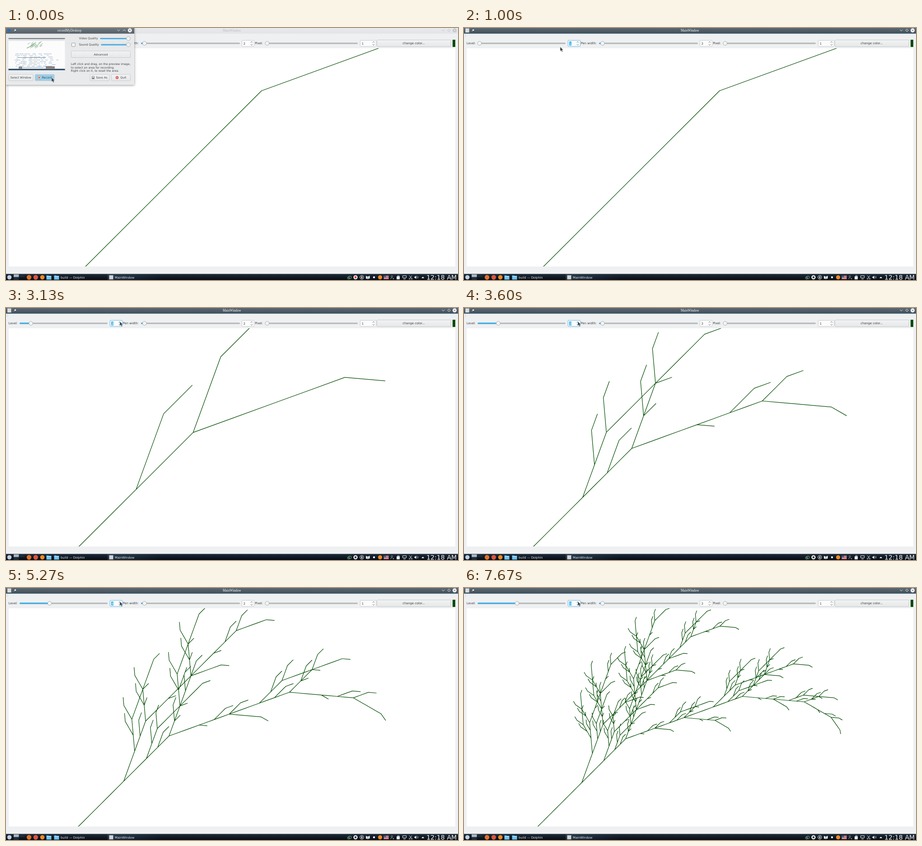
An HTML page with a canvas that plays this animation: 1001x559 px, repeating every 8000 ms.

```html
<!DOCTYPE html>
<html lang="en">
<head>
<meta charset="utf-8">
<title>Branching plant</title>
<style>
html, body { margin: 0; width: 100%; height: 100%; overflow: hidden; background: #eff0f1; }
canvas { display: block; }
</style>
</head>
<body>
<canvas id="stage" width="1001" height="559"></canvas>
<script>
const ctx = document.getElementById('stage').getContext('2d');
const LOOP = 8000;
const SANS = '"DejaVu Sans", sans-serif';
const SERIF = '"Liberation Serif", serif';
const BLUE = '#3daee9', INK = '#31363b', PANEL = '#eff0f1', GREEN = '#004b00';
const VIEW = { x: 6, y: 45, w: 989, h: 484 };

// ---- drawing helpers ----
function rect(x, y, w, h, fill) {
  ctx.fillStyle = fill;
  ctx.fillRect(x, y, w, h);
}
function box(x, y, w, h, fill, stroke, r = 1.5) {
  ctx.beginPath();
  ctx.roundRect(x, y, w, h, r);
  ctx.fillStyle = fill;
  ctx.fill();
  if (!stroke) return;
  ctx.strokeStyle = stroke;
  ctx.lineWidth = 0.8;
  ctx.stroke();
}
function disc(x, y, r, fill, stroke, width = 0.7) {
  ctx.beginPath();
  ctx.arc(x, y, r, 0, Math.PI * 2);
  if (fill) { ctx.fillStyle = fill; ctx.fill(); }
  if (stroke) { ctx.strokeStyle = stroke; ctx.lineWidth = width; ctx.stroke(); }
}
function lines(points, color, width = 0.9, close = false) {
  ctx.beginPath();
  for (let i = 0; i < points.length; i += 2) ctx.lineTo(points[i], points[i + 1]);
  if (close) ctx.closePath();
  ctx.strokeStyle = color;
  ctx.lineWidth = width;
  ctx.stroke();
}
function shape(points, fill) {
  ctx.beginPath();
  for (let i = 0; i < points.length; i += 2) ctx.lineTo(points[i], points[i + 1]);
  ctx.fillStyle = fill;
  ctx.fill();
}
function text(str, x, y, size = 6.7, color = INK, align = 'left', family = SANS) {
  ctx.font = `${size}px ${family}`;
  ctx.textAlign = align;
  ctx.textBaseline = 'alphabetic';
  ctx.fillStyle = color;
  ctx.fillText(str, x, y);
}
function shade(y0, y1, from, to) {
  const g = ctx.createLinearGradient(0, y0, 0, y1);
  g.addColorStop(0, from);
  g.addColorStop(1, to);
  return g;
}
const chevron = (x, y, s, dir, color, width = 0.9) =>
  lines([x - s, y + dir * s / 2, x, y - dir * s / 2, x + s, y + dir * s / 2], color, width);
function cross(x, y, s, color) {
  lines([x - s, y - s, x + s, y + s], color);
  lines([x - s, y + s, x + s, y - s], color);
}

// ---- the plant: X -> F-[[X]+X]+F[+FX]-X, F -> FF ----
const RULES = { X: 'F-[[X]+X]+F[+FX]-X', F: 'FF' };

function plant(level) {
  let word = 'X';
  for (let i = 0; i < level; i++) word = word.replace(/[XF]/g, c => RULES[c]);
  const turn = 25 * Math.PI / 180, segs = [], stack = [];
  let x = 0, y = 0, a = Math.PI / 4;
  let x0 = 0, x1 = 0, y0 = 0, y1 = 0;
  for (const c of word) {
    if (c === 'F') {
      const nx = x + Math.cos(a), ny = y - Math.sin(a);
      segs.push([x, y, nx, ny]);
      x = nx; y = ny;
      x0 = Math.min(x0, x); x1 = Math.max(x1, x);
      y0 = Math.min(y0, y); y1 = Math.max(y1, y);
    } else if (c === '+') a -= turn;
    else if (c === '-') a += turn;
    else if (c === '[') stack.push([x, y, a]);
    else if (c === ']') [x, y, a] = stack.pop();
  }
  const k = Math.min(VIEW.w / (x1 - x0), VIEW.h / (y1 - y0));
  const ox = VIEW.x + VIEW.w / 2 - k * (x0 + x1) / 2;
  const oy = VIEW.y + VIEW.h / 2 - k * (y0 + y1) / 2;
  const path = new Path2D();
  for (const [ax, ay, bx, by] of segs) {
    path.moveTo(ox + k * ax, oy + k * ay);
    path.lineTo(ox + k * bx, oy + k * by);
  }
  return path;
}
const plants = [1, 2, 3, 4, 5].map(plant);

// ---- timeline ----
const LEVEL_TIMES = [2000, 3530, 5130, 6870];
const BLINKS = [2670, 3130, 3670, 4200, 4670, 5130, 5670, 6200, 6670, 7200, 7670];
const FADE = [[0, 0.94], [70, 0.6], [130, 0.27], [200, 0.07], [270, 0]];
const POINTER = [[600, 101, 110], [800, 146, 82], [1000, 213, 42], [1200, 249, 26], [1400, 252, 30]];

const countPast = (times, t) => times.filter(s => t >= s).length;
const fadeAt = t => FADE.filter(s => t >= s[0]).pop()[1];

function pointerAt(t) {
  const step = Math.floor(t / 66.67 + 0.05) * 66.67;
  const last = POINTER[POINTER.length - 1];
  if (step <= POINTER[0][0]) return POINTER[0].slice(1);
  if (step >= last[0]) return last.slice(1);
  const i = POINTER.findIndex(p => p[0] > step);
  const [ta, xa, ya] = POINTER[i - 1], [tb, xb, yb] = POINTER[i];
  const k = (step - ta) / (tb - ta);
  return [xa + (xb - xa) * k, ya + (yb - ya) * k];
}

// ---- widgets ----
function slider(x0, x1, y, knob, groove = 3, r = 4.4) {
  box(x0, y - groove / 2, x1 - x0, groove, '#b4b6b7', null);
  if (knob - x0 > 4.6) box(x0, y - groove / 2, knob - x0, groove, BLUE, null);
  disc(knob, y, r, '#f3f4f4', '#9b9d9f', 0.8);
}
function spin(x, w, value, focus) {
  box(x + 0.4, 27.4, w - 0.8, 13.4, '#fcfcfc', focus ? BLUE : '#c0c2c4');
  const cx = x + w - 6;
  chevron(cx, 31.2, 2.4, 1, '#4d5257', 0.8);
  chevron(cx, 37.1, 2.4, -1, '#4d5257', 0.8);
  if (focus) rect(233, 30, 5, 8.6, BLUE);
  text(value, x + 3.7, 36.6, 6.7, focus ? '#fcfcfc' : INK);
}
function button(label, x, y, w, h, size, cx, fill = shade(y, y + h, '#f2f3f3', '#e6e7e8')) {
  box(x + 0.5, y + 0.5, w - 1, h - 1, fill, '#bfc1c3');
  text(label, cx, y + h / 2 + size * 0.36, size, INK, 'center');
}
function pin(x, y, color) {
  lines([x - 2.4, y + 2.4, x, y], color, 0.8);
  shape([x - 1.6, y - 0.6, x + 0.6, y - 2.6, x + 2.6, y - 0.6, x + 0.6, y + 1.6], color);
}

// ---- main window ----
function mainWindow(t, level, active) {
  rect(0, 0, 1001, 546, PANEL);
  const tone = active ? '#fcfcfc' : '#babcbe';
  rect(0, 0, 1001, 12.5, active ? shade(0, 12.5, '#5c6872', '#434e57') : shade(0, 12.5, '#e9eaeb', '#e3e4e6'));
  if (active) rect(0, 12, 1001, 0.8, '#6aa5c4');
  text('MainWindow', 500.3, 7.9, 7.35, tone, 'center', SERIF);
  rect(3, 1, 8.5, 9, '#d9dbdc');
  pin(20, 5, tone);
  chevron(968.3, 5.2, 3, -1, tone);
  lines([981, 2.2, 984, 5.2, 981, 8.2, 978, 5.2], tone, 0.9, true);
  disc(993.5, 5.2, 4.5, active ? '#fcfcfc' : '#c5c7c9');
  cross(993.5, 5.2, 1.8, active ? '#475057' : PANEL);

  for (let y = 14.5; y < 20; y += 2) rect(2.5, y, 2, 0.8, '#c9cbcd');
  text('Level:', 5.8, 36.4);
  slider(30, 225, 34, 34.4 + 20.75 * (level - 1));
  spin(230, 28, level, true);
  if (t >= 2000 && countPast(BLINKS, t) % 2 === 0) rect(236.3, 30.3, 0.6, 7.7, '#d8ecf6');
  text('Pen width:', 258.8, 36.4);
  slider(299, 518, 34, 306.8);
  spin(522, 28, 2);
  text('Pixel:', 551.2, 36.4);
  slider(574, 779, 34, 578.3);
  spin(784, 36, 1);
  button('change color...', 821, 26, 165, 16, 6.75, 903);
  rect(989, 26, 6, 16, GREEN);

  rect(VIEW.x, VIEW.y, VIEW.w, VIEW.h, '#fff');
  ctx.save();
  ctx.beginPath();
  ctx.rect(VIEW.x, VIEW.y, VIEW.w, VIEW.h);
  ctx.clip();
  ctx.strokeStyle = GREEN;
  ctx.lineWidth = 1.2;
  ctx.lineCap = 'round';
  ctx.stroke(plants[level - 1]);
  ctx.restore();
  ctx.lineCap = 'butt';
}

// ---- recorder dialog ----
function preview() {
  rect(5.5, 22.5, 125, 72, '#fdfdfd');
  rect(5.5, 22.5, 125, 2, '#4b545c');
  rect(5.5, 24.5, 125, 4, '#dfe2e5');
  rect(5.5, 90.5, 125, 3.5, '#223548');
  rect(5.5, 93, 125, 1, '#4a90c4');
  let seed = 7;
  const rnd = () => (seed = (seed * 16807) % 2147483647) / 2147483647;
  for (let i = 0; i < 26; i++) {
    const x = 46 + rnd() * 32, y = 29 + rnd() * 14;
    lines([x, y + 3, x + 3 + rnd() * 3, y], '#64986a', 0.8);
  }
  lines([46, 45, 62, 36], '#477d4d', 0.8);
  for (let row = 0; row < 9; row++) {
    for (let x = 18 + rnd() * 8; x < 88 + rnd() * 25; x += 3 + rnd() * 12)
      rect(x, 57 + row * 3.4, 2 + rnd() * 7, 0.9, rnd() < 0.5 ? '#7ba9d9' : '#a5adb5');
  }
  rect(26, 65, 62, 0.8, '#596b7b');
  rect(28, 85.5, 8, 4.5, '#7d8588');
  rect(37, 87, 46, 1, '#8a9ba7');
  rect(88, 85, 20, 5, '#8a7770');
}
function dialog(alpha) {
  if (!alpha) return;
  ctx.save();
  ctx.globalAlpha = alpha;
  ctx.shadowColor = 'rgba(0,0,0,.45)';
  ctx.shadowBlur = 5;
  ctx.shadowOffsetY = 1;
  rect(-4, -4, 288, 130, PANEL);
  ctx.shadowColor = 'transparent';
  rect(0, 0, 284, 12.5, shade(0, 12.5, '#66717a', '#4b565f'));
  text('recordMyDesktop', 140.5, 7.9, 7.3, '#fcfcfc', 'center', SERIF);
  disc(7, 5.3, 3.5, '#2f6fae');
  pin(20, 5, '#fcfcfc');
  chevron(249.3, 5.2, 3, -1, '#fcfcfc');
  chevron(261.8, 5.2, 3, 1, '#fcfcfc');
  disc(274.3, 5.2, 4.5, '#fcfcfc');
  cross(274.3, 5.2, 1.8, '#475057');
  preview();

  const size = 6.25;
  text('Video Quality', 161.8, 25.4, size);
  slider(208.5, 275, 23.3, 271, 2.8);
  box(145.4, 33.2, 7.8, 7.8, '#f6f7f7', '#7d8083', 0.8);
  text('Sound Quality', 161.8, 39.2, size);
  slider(210.5, 275, 37.2, 271, 2.8);
  button('Advanced', 144, 50.5, 132, 15.5, size, 210);
  text('Left click and drag, on the preview image,', 143.8, 82.2, size);
  text('to select an area for recording.', 143.8, 89.6, size);
  text('Right click on it, to reset the area.', 143.8, 97, size);
  button('Select Window', 5.5, 102.5, 55, 15, size, 32.8);
  button('Record', 64, 102.5, 43.5, 15, size, 90.6, '#93cee9');
  disc(73.5, 110, 3.6, '#fcfcfc', '#7a7f83');
  disc(73.5, 110, 1.9, '#d8402f');
  button('Save As', 185.5, 102.5, 44, 15, size, 212);
  lines([190.5, 107.2, 195.5, 107.2, 195.5, 112.8, 190.5, 112.8], '#555a5f', 0.8, true);
  rect(191.6, 110, 2.8, 2.6, '#555a5f');
  button('Quit', 233, 102.5, 43, 15, size, 259.8);
  disc(246, 110, 3.2, '#cf4747');
  cross(246, 110, 1.3, '#fcfcfc');
  ctx.restore();
}

// ---- taskbar ----
function folder(x) {
  rect(x - 5.5, 548.3, 5, 3, '#2a87c4');
  rect(x - 5.5, 549.6, 11, 8.4, '#6cc1f0');
  rect(x - 4.5, 551, 9, 1, '#e4f4fd');
}
function tray(recording) {
  const w = '#e8eaec';
  disc(758.5, 554.4, 2.4, null, '#8fc9a0', 0.9);
  disc(761.8, 553.3, 3.1, null, '#8fc9a0', 0.9);
  disc(774, 553, 4.6, '#f4f4f4');
  if (recording) disc(774, 553, 2.4, '#d9382c');
  else rect(772, 551, 4, 4, '#23282d');
  disc(788, 553, 4, null, w, 1.1);
  rect(786.8, 551, 2.4, 4.2, w);
  shape([797, 550, 801, 551.2, 801, 557, 797, 555.8], w);
  shape([801.6, 551.2, 805.6, 549.6, 805.6, 555.4, 801.6, 557], w);
  rect(813, 551, 4, 4, w);
  disc(828.5, 553, 4.6, '#f08a24');
  for (let i = 0; i < 7; i++) rect(836.5, 549 + i * 1.2, 11, 1.2, i % 2 ? '#f0e8e8' : '#c9474c');
  rect(836.5, 549, 5, 4.2, '#3e5590');
  disc(854.5, 551, 1.7, null, '#9ea4aa', 0.9);
  lines([851.8, 557, 852.6, 554.2, 856.2, 554.2], '#9ea4aa');
  disc(858, 556, 1.2, '#9ea4aa');
  rect(865, 551, 7, 6.5, w);
  rect(867, 548.5, 1.3, 3, w);
  rect(869.6, 548.5, 1.3, 3, w);
  lines([878.5, 549.5, 886.5, 549.5, 886.5, 554.2, 878.5, 554.2], w, 1, true);
  rect(880, 556.2, 5, 1, w);
  lines([893.3, 549, 898, 555.5], w);
  lines([899, 549, 894.3, 555.5], w);
  disc(893.7, 556.3, 1.3, null, w);
  disc(898.6, 556.3, 1.3, null, w);
  shape([904.5, 551.6, 906.2, 551.6, 908.6, 549.2, 908.6, 557, 906.2, 554.6, 904.5, 554.6], w);
  for (const r of [2, 4]) {
    ctx.beginPath();
    ctx.arc(908.8, 553.1, r, -0.9, 0.9);
    ctx.stroke();
  }
  shape([920, 555, 923.2, 551.4, 926.4, 555], w);
}
function taskbar(recording) {
  rect(0, 545.5, 1001, 14, shade(545.5, 559, '#1d2b38', '#070c13'));
  const glow = ctx.createLinearGradient(225, 0, 345, 0);
  glow.addColorStop(0, 'rgba(70,100,125,.35)');
  glow.addColorStop(1, 'rgba(70,100,125,0)');
  rect(225, 546, 120, 13, glow);
  disc(7.5, 553, 4.8, '#bcd0e6');
  rect(17, 546.5, 11.5, 6, '#a9b7c3');
  rect(30, 546.5, 11, 6, '#1f2b37');
  rect(17, 553, 11.5, 6, '#1f2b37');
  disc(51, 553, 5.2, '#e2702a');
  disc(65.8, 553, 5.2, '#d9553f');
  disc(80.5, 553, 4.8, '#f08a24');
  folder(95);
  folder(112);
  text('build — Dolphin', 121, 555.9, 6.75, '#e6e9ec');
  rect(228.5, 548.5, 9, 9, '#d0d2d4');
  text('MainWindow', 241, 555.9, 6.85, '#e6e9ec');
  tray(recording);
  text('12:18 AM', 931, 558.2, 14.2, '#f2f4f5');
}

function pointer(x, y) {
  const p = [0, 0, 0, 9.3, 2.1, 7.4, 3.9, 11, 5.5, 10.2, 3.9, 6.9, 6.6, 6.6];
  const q = p.map((v, i) => v + (i % 2 ? y : x));
  shape(q, '#3a3f45');
  lines(q, 'rgba(235,237,239,.8)', 0.5, true);
}

function draw(now) {
  const t = now % LOOP;
  const level = 1 + countPast(LEVEL_TIMES, t);
  mainWindow(t, level, t >= 70);
  dialog(fadeAt(t));
  taskbar(t < 270);
  pointer(...pointerAt(t));
}

let start;
function tick(now) {
  start ??= now;
  draw(now - start);
  requestAnimationFrame(tick);
}
draw(0);
requestAnimationFrame(tick);
</script>
</body>
</html>
```
